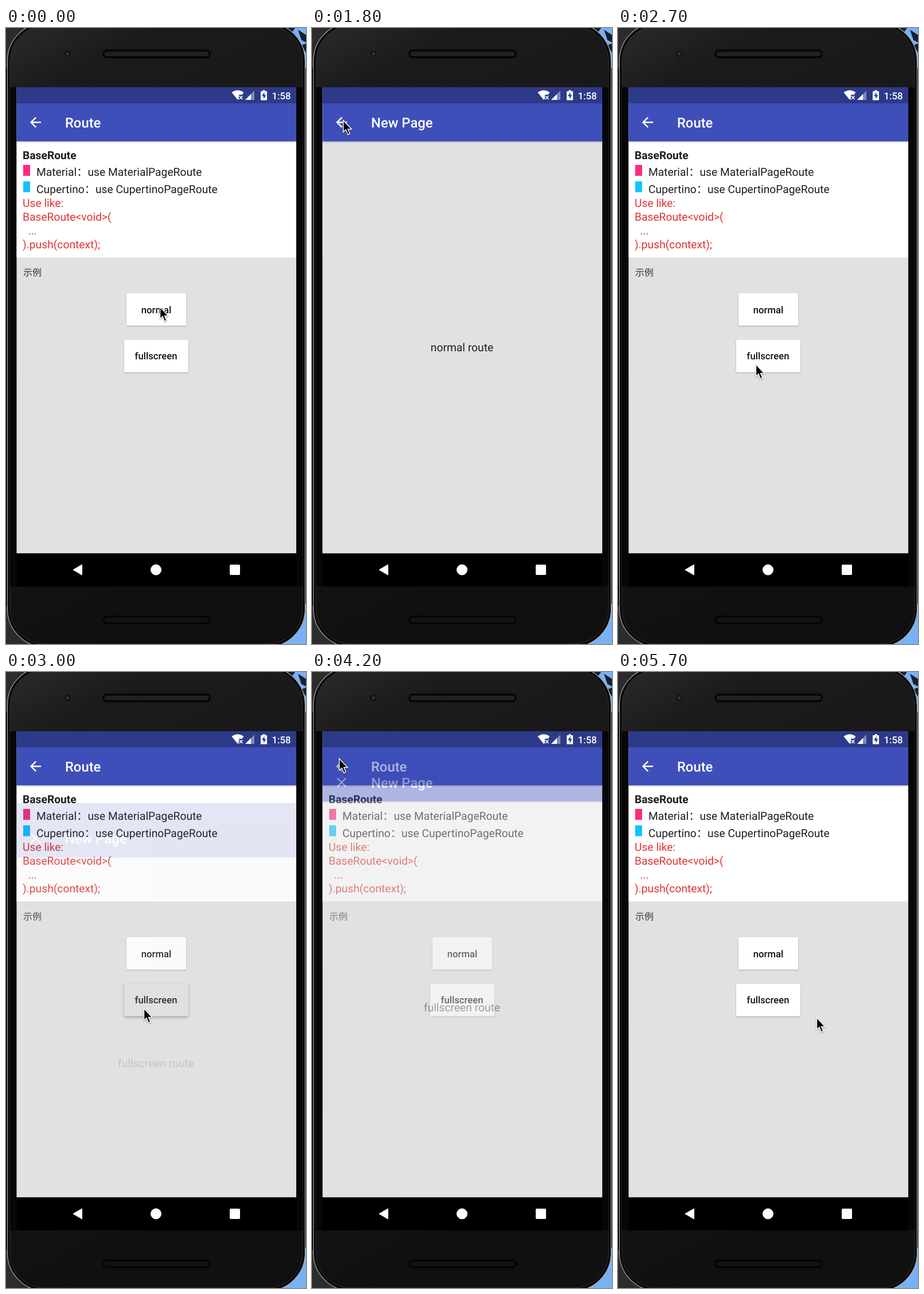
Write an HTML page that moves like this. It is 523 px wide and 1071 px high and loops after 6000 ms.

```html
<!DOCTYPE html>
<html lang="zh-CN">
<head>
<meta charset="utf-8">
<title>Route</title>
<style>
  html, body { margin: 0; width: 100%; height: 100%; overflow: hidden; background: #000; }
  svg { display: block; width: 523px; height: 1071px; }
  text {
    font: 400 19.25px Roboto, "Noto Sans CJK SC", "Noto Sans CJK", sans-serif;
    fill: #1e1e1e; white-space: pre; text-rendering: geometricPrecision;
  }
  .title { font-size: 23.8px; font-weight: 500; fill: #fff; }
  .label { font-size: 16.7px; font-weight: 500; fill: #111; text-anchor: middle; }
  .bold { font-weight: 700; }
  .code text { fill: #e03434; }
  .center { text-anchor: middle; }
  .button { fill: #fff; filter: drop-shadow(0 1px 1px #0004); }
  .pressed { fill: #e0e0e0; filter: drop-shadow(0 2px 2px #0005); }
  .bar { fill: #3f4fb9; filter: drop-shadow(0 1px 1.5px #0005); }
  #cursor { filter: drop-shadow(0 1px 1px #0006); }
</style>
</head>
<body>
<svg viewBox="0 0 523 1071">
  <defs>
    <linearGradient id="shell" x2=".25" y2="1">
      <stop stop-color="#2b2b2b"/><stop offset=".12" stop-color="#1b1b1b"/><stop offset="1" stop-color="#101010"/>
    </linearGradient>
    <clipPath id="screen"><path d="M18.5 103H506V913.5H18.5Z"/></clipPath>
    <path id="back" transform="translate(37.2 149.7) scale(1.19)" fill="#fff"
      d="M20 11H7.83l5.59-5.59L12 4l-8 8 8 8 1.41-1.41L7.83 13H20z"/>
    <path id="close" transform="translate(37.2 149.7) scale(1.19)" fill="#fff"
      d="M19 6.41 17.59 5 12 10.59 6.41 5 5 6.41 10.59 12 5 17.59 6.41 19 12 13.41 17.59 19 19 17.59 13.41 12z"/>
    <g id="speaker">
      <rect x="168" y="37.5" width="189" height="15" rx="7.5" fill="#050505"/>
      <rect x="171.5" y="41" width="182" height="8" rx="4"/>
    </g>
  </defs>

  <!-- Desktop and phone shell -->
  <path d="M0 0H60V70H0Z M0 1005H60V1071H0Z" fill="#2c2c2c"/>
  <path d="M470 0H523V70Z M523 1000V1071H470Z" fill="#78b2f5"/>
  <path d="M486 0h18l-5 7 5 4-7-2zM509 3l14 9v13l-8-4-3-9zM515 30l8-3v16z" fill="#15202c"/>
  <rect x="2.5" y="-9" width="519" height="1085" rx="66" fill="#080808" stroke="#aaa" stroke-width="1.2"/>
  <rect x="7" y="-4" width="510" height="1075" rx="61" fill="url(#shell)" stroke="#303030"/>
  <path d="M7 103V971H18.5V103Z M506 103V971H517V103Z" fill="#070707"/>
  <use href="#speaker" fill="#202020"/><use href="#speaker" y="984" fill="#121212"/>
  <circle cx="107" cy="45" r="7" fill="#151515" stroke="#292929"/><circle cx="107" cy="45" r="2.5" fill="#383838"/>

  <g clip-path="url(#screen)">
    <path d="M18 103H506V914H18Z" fill="#e1e1e1"/>
    <path d="M18 197H506V399H18Z" fill="#fff"/>
    <path class="bar" d="M18 103H506V197H18Z"/>
    <use href="#back"/>
    <text class="title" x="103" y="173">Route</text>
    <text class="bold" x="29" y="228">BaseRoute</text>
    <path d="M30 238h12v19h-12z" fill="#ff2a80"/>
    <path d="M30 266.500h12v19h-12z" fill="#12c2ff"/>
    <text x="53" y="257">Material：use MaterialPageRoute</text>
    <text x="53" y="286.5">Cupertino：use CupertinoPageRoute</text>
    <g class="code">
      <text x="29" y="311">Use like:</text>
      <text x="29" y="335">BaseRoute&lt;void&gt;(</text>
      <text x="38.5" y="359">...</text>
      <text x="29" y="383">).push(context);</text>
    </g>
    <text x="30" y="430.5" style="font-size:16px;fill:#333">示例</text>
    <rect id="normal" class="button" x="210" y="461" width="104" height="56.5" rx="2"/>
    <text class="label" x="262" y="495.5">normal</text>
    <rect id="fullscreen" class="button" x="206" y="542" width="112" height="56.5" rx="2"/>
    <text class="label" x="261.5" y="576">fullscreen</text>

    <g id="page">
      <path d="M18 103H506V914H18Z" fill="#e1e1e1"/>
      <path class="bar" d="M18 103H506V197H18Z"/>
      <use id="icon" href="#back"/>
      <text class="title" x="103" y="173">New Page</text>
      <text id="caption" class="center" x="261.5" y="562"></text>
    </g>
  </g>

  <!-- Status bar -->
  <path d="M18.5 103H506V131H18.5Z" fill="#2d3a89"/>
  <g fill="#fff">
    <path d="M393.5 112Q404 104.5 414.5 112L411.5 116H406V123L404 125Z"/>
    <path d="M407 118l5.5 6m0-6l-5.5 6" stroke="#fff" stroke-width="1.5"/>
    <path d="M417 125L433 109V125Z" opacity=".4"/>
    <path d="M417 125L427 115V125Z"/>
    <path d="M444 110h3.5v-2h4v2h3.5v15.5h-11z"/>
    <path d="M450.5 111.5l-4.5 7h3v5l4.5-7h-3z" fill="#2d3a89"/>
  </g>
  <text x="463.5" y="123.5" style="font-size:16.8px;font-weight:500;fill:#fff">1:58</text>

  <!-- Navigation bar -->
  <path d="M18.5 913.5H506V971H18.5Z"/>
  <g fill="#fff" stroke="#fff" stroke-linejoin="round">
    <path d="M117 942L132.5 933V951Z"/>
    <circle cx="261.5" cy="942" r="9"/>
    <rect x="390.5" y="933.5" width="17" height="17" rx="1"/>
  </g>

  <path id="cursor" d="M0 0V20.5L4.5 16.5 8 25 11.5 23.5 8 15.5H14.5Z" stroke="#fff" stroke-width="1.4"/>
</svg>
<script>
  const $ = id => document.getElementById(id);
  const STEP = 300, LOOP = 6000;

  // start ms, pointer x and y
  const pointer = [
    [0, 268.5, 485], [1500, 100, 230], [1800, 54.5, 160.5], [2400, 240.5, 501],
    [2700, 240.5, 585], [3300, 197.5, 465.5], [3600, 84, 228], [3900, 47.5, 150.5],
    [4500, 97, 169], [4800, 346.5, 601]
  ];
  // start ms, route kind, slide offset, opacity, button held down
  const route = [
    [0, 'normal', 0, 0], [900, 'normal', 160, .09, true], [1200, 'normal', 0, 1],
    [2100, 'normal', 65, .25], [2400, 'fullscreen', 0, 0],
    [3000, 'fullscreen', 125, .14, true], [3300, 'fullscreen', 0, 1],
    [4200, 'fullscreen', 28, .42], [4500, 'fullscreen', 0, 0]
  ];
  const at = (track, time) => track.findLast(key => key[0] <= time);

  function draw(now) {
    const time = Math.floor(now % LOOP / STEP) * STEP;
    const [, x, y] = at(pointer, time);
    const [, kind, offset, opacity, held] = at(route, time);
    $('cursor').setAttribute('transform', `translate(${x} ${y})`);
    $('page').setAttribute('transform', `translate(0 ${offset})`);
    $('page').setAttribute('opacity', opacity);
    $('icon').setAttribute('href', kind === 'normal' ? '#back' : '#close');
    $('caption').textContent = kind + ' route';
    for (const id of ['normal', 'fullscreen'])
      $(id).setAttribute('class', held && id === kind ? 'pressed' : 'button');
  }

  const start = performance.now();
  function tick() {
    draw(performance.now() - start);
    requestAnimationFrame(tick);
  }
  tick();
</script>
</body>
</html>
```
